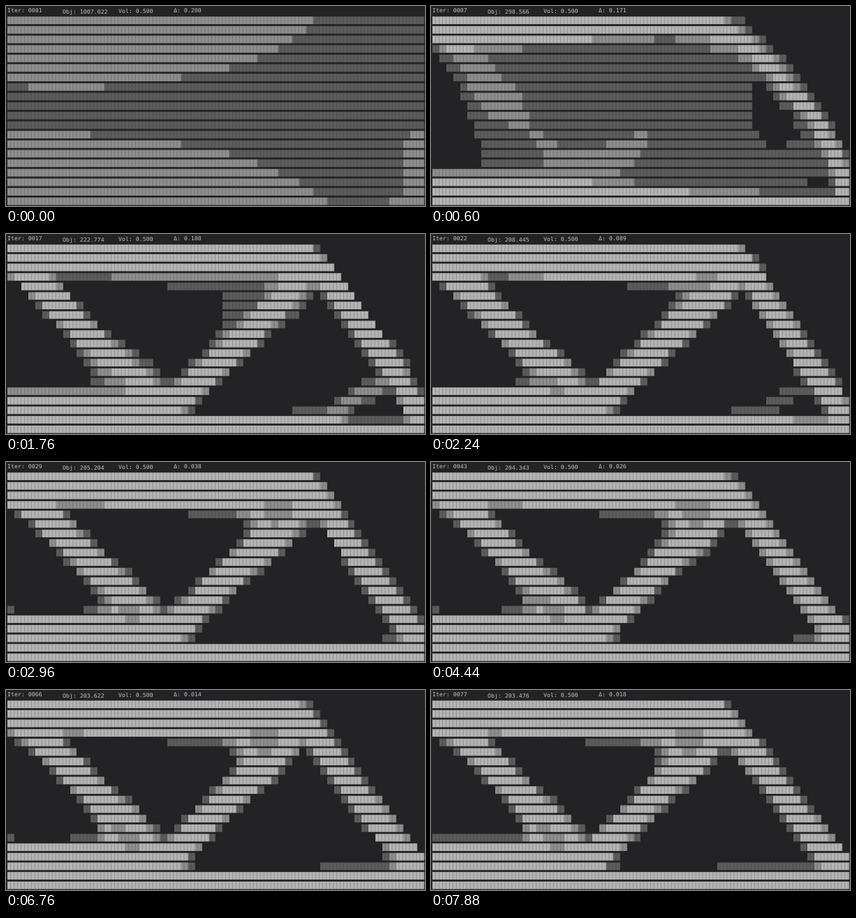
Write a matplotlib script that moves like this. It is 600 px wide and 287 px high and loops after 8 s.

```python
import numpy as np
import matplotlib.pyplot as plt
from matplotlib.animation import FuncAnimation
from matplotlib.colors import ListedColormap

W, H, DPI = 600, 287, 100
NX, NY = 60, 20
VOLFRAC, PENAL, RMIN = 0.5, 3.0, 1.5
ITERATIONS = 77
TICK, LOOP = 40, 8000

BG = "#232224"
SHADES = [BG, "#5c5c5c", "#8e8e8e", "#b4b4b4"]
LEVELS = [0.25, 0.5, 0.75]
LEFT, CHAR = 1.6, 4.967
LINE = H / 21


def px(n):
    """Pixels to points."""
    return n * 72 / DPI


# ---- topology optimisation of a half MBB beam (SIMP) ----

def element_stiffness(nu=0.3):
    k = np.array([1/2 - nu/6, 1/8 + nu/8, -1/4 - nu/12, -1/8 + 3*nu/8,
                  -1/4 + nu/12, -1/8 - nu/8, nu/6, 1/8 - 3*nu/8])
    rows = ["01234567", "10765432", "27056341", "36507214",
            "45670123", "54321076", "63412705", "72143650"]
    ke = np.array([[k[int(c)] for c in r] for r in rows]) / (1 - nu**2)
    order = [0, 1, 6, 7, 2, 3, 4, 5]  # left side first, then right side
    return ke[np.ix_(order, order)]


KE = element_stiffness()


def displacements(x):
    """Block tridiagonal solve, one block per column of nodes."""
    n = 2 * (NY + 1)
    diag = np.zeros((NX + 1, n, n))
    off = np.zeros((NX, n, n))
    for i in range(NY):
        s = slice(2 * i, 2 * i + 4)
        e = (x[i] ** PENAL)[:, None, None]
        diag[:-1, s, s] += e * KE[:4, :4]
        diag[1:, s, s] += e * KE[4:, 4:]
        off[:, s, s] += e * KE[:4, 4:]

    # Symmetry on the left edge, roller in the lower right corner.
    for col, fixed in ((0, np.arange(0, n, 2)), (-1, np.array([n - 1]))):
        diag[col][fixed, :] = 0
        diag[col][:, fixed] = 0
        diag[col][fixed, fixed] = 1
    off[0][0::2, :] = 0
    off[-1][:, n - 1] = 0

    load = np.zeros(n)
    load[1] = -1
    schur, steps = diag[0], []
    for c in range(NX):
        sol = np.linalg.solve(schur, np.column_stack([off[c], load]))
        steps.append(sol)
        schur = diag[c + 1] - off[c].T @ sol[:, :-1]
        load = -off[c].T @ sol[:, -1]
    u = np.zeros((NX + 1, n))
    u[NX] = np.linalg.solve(schur, load)
    for c in range(NX - 1, -1, -1):
        u[c] = steps[c][:, -1] - steps[c][:, :-1] @ u[c + 1]
    return u


def neighbour_sum(a):
    p = np.pad(a, 1)
    total = np.zeros_like(a)
    for dy in (-1, 0, 1):
        for dx in (-1, 0, 1):
            weight = max(0.0, RMIN - np.hypot(dx, dy))
            total += weight * p[1 + dy:1 + dy + NY, 1 + dx:1 + dx + NX]
    return total


WEIGHTS = neighbour_sum(np.ones((NY, NX)))


def optimality_update(x, dc, move=0.2):
    low, high = 0.0, 1e5
    lower = np.maximum(0.001, x - move)
    upper = np.minimum(1.0, x + move)
    while high - low > 1e-4:
        mid = (low + high) / 2
        new = np.clip(x * np.sqrt(-dc / mid), lower, upper)
        if new.sum() > VOLFRAC * x.size:
            low = mid
        else:
            high = mid
    return new


def optimise():
    x = np.full((NY, NX), VOLFRAC)
    history = []
    for it in range(1, ITERATIONS + 1):
        u = displacements(x)
        energy = np.empty_like(x)
        for i in range(NY):
            s = slice(2 * i, 2 * i + 4)
            ue = np.hstack([u[:-1, s], u[1:, s]])
            energy[i] = np.sum(ue @ KE * ue, axis=1)
        obj = np.sum(x ** PENAL * energy)
        dc = -PENAL * x ** (PENAL - 1) * energy
        dc = neighbour_sum(x * dc) / (x * WEIGHTS)
        new = optimality_update(x, dc)
        change = np.abs(new - x).max()
        x = new
        fields = (f"Iter: {it:04d}", f"Obj: {obj:.3f}",
                  f"Vol: {x.mean():.3f}", f"Δ: {change:.3f}")
        history.append((fields, np.digitize(x, LEVELS)))
    return history


HISTORY = optimise()

# Iteration number and the time in ms at which it is printed.
PACE = np.array([
    (1, 0), (2, 40), (7, 600), (9, 760), (11, 1000), (12, 1200), (17, 1760),
    (18, 1840), (19, 1960), (20, 2040), (28, 2840), (29, 2960), (30, 3080),
    (36, 3680), (37, 3800), (43, 4440), (45, 4600), (46, 4720), (53, 5440),
    (54, 5560), (55, 5640), (56, 5760), (62, 6360), (63, 6440), (69, 7040),
    (70, 7200), (77, 7880)])
TIMES = np.interp(np.arange(1, ITERATIONS + 1), PACE[:, 0], PACE[:, 1])
TICKS = np.round(TIMES / TICK).astype(int)

# ---- terminal picture ----

plt.rcParams["text.hinting"] = "none"
fig = plt.figure(figsize=(W / 100, H / 100), dpi=DPI, facecolor=BG)
ax = fig.add_axes([0, 0, 1, 1])
right = LEFT + 2 * NX * CHAR
grid = ax.imshow(HISTORY[0][1], cmap=ListedColormap(SHADES), vmin=-0.5,
                 vmax=3.5, interpolation="nearest", aspect="auto",
                 extent=(LEFT, right, H, LINE))
ax.set_xlim(0, W)
ax.set_ylim(H, 0)
ax.axis("off")

seams = LEFT + CHAR * np.arange(2 * NX + 1)
ax.vlines(seams, LINE, H, color=BG, lw=px(1), alpha=0.24, snap=False)
gaps = LINE * np.arange(1, NY + 2) + 0.1
ax.hlines(gaps, 0, W, color=BG, lw=px(2.8), snap=False)

labels = [ax.text(LEFT + 0.2 + CHAR * col, 10.2, "", color="#c4c4c4",
                  family="DejaVu Sans Mono", size=px(CHAR / 0.602),
                  va="baseline")
          for col in (0, 16, 32, 48)]


def update(frame):
    step = np.searchsorted(TICKS, frame, side="right") - 1
    fields, shades = HISTORY[step]
    grid.set_data(shades)
    for label, field in zip(labels, fields):
        label.set_text(field)
    return [grid, *labels]


anim = FuncAnimation(fig, update, frames=LOOP // TICK, interval=TICK,
                     repeat=True, repeat_delay=0, blit=False)
plt.show()
```
